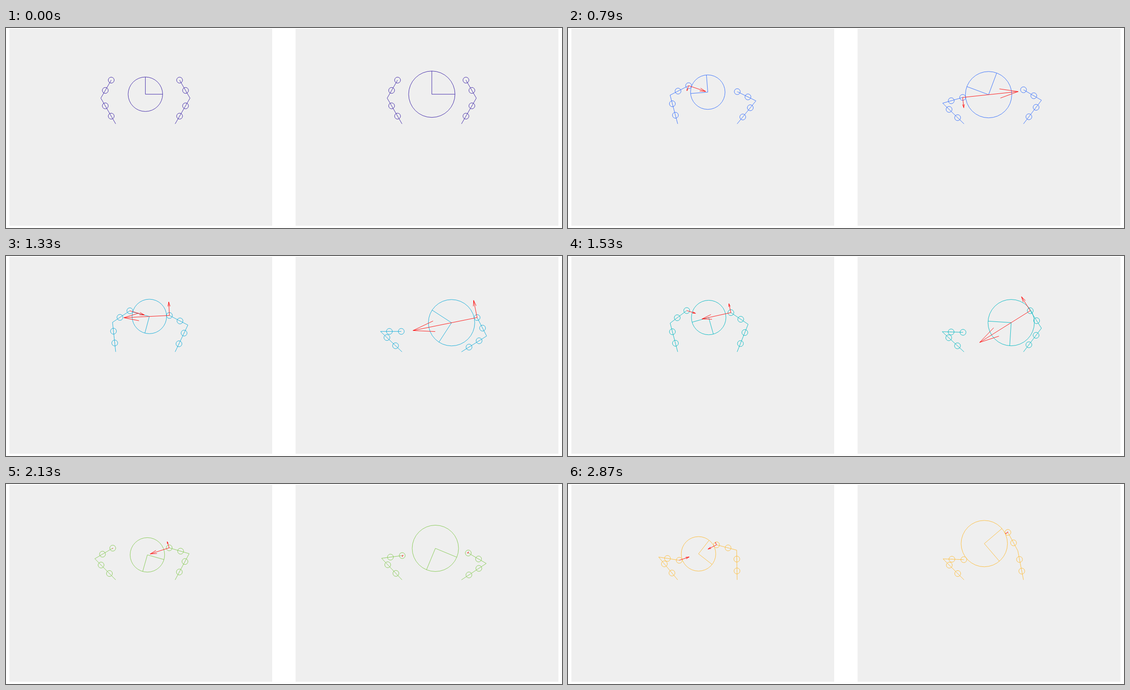
Write an HTML page with a canvas that moves like this. It is 1247 px wide and 449 px high and loops after 3.6 s.

```html
<!DOCTYPE html>
<html lang="en">
<head>
<meta charset="utf-8">
<title>Two-finger manipulation</title>
<style>
html, body { margin: 0; width: 100%; height: 100%; overflow: hidden; background: #fff; }
canvas { display: block; width: 1247px; height: 449px; }
</style>
</head>
<body>
<canvas id="stage" width="1247" height="449"></canvas>
<script>
const ctx = document.getElementById('stage').getContext('2d');
const LOOP = 3600, TICK = 66.6, LAST = 29;
const UNIT = 66.67, TIP = 46.67, PAD = 6.67, BASE_Y = 215.2;
const RAD = Math.PI / 180;

// pose: step, ball x, ball y, ball turn, left link angles, right link angles
// force: step, left normal, left tangent, right normal, right tangent
const panels = [
  {
    left: 8, base: 246, radius: 38.7,
    pose: [
      [0, 312.6, 148.7, 0, -30, 30, 30, -30],
      [3, , , , -28.5],
      [4, 334, 159.7, 23, -2, 90.3, 44, -88.4],
      [8, 313.5, 144, 94.5, -14.8, 62.9, 39.2, -63.7],
      [14, 321.5, 135.7, 165, -6.1, 56.3, 25.4, -62.6],
      [17, , , , -23],
      [18, , , , -44],
      [19, 304.5, 146.2, 237, -42.9, 48.9, 18.4, -44.3],
      [25, 329.7, 168, 271, -47.4, 77.6, 37.9, -103],
      [26, , , , -48.2],
      [29, 292.7, 156.8, 322, -39.8, 99, -0.9, -75.1]
    ],
    force: [
      [0, 0, 0, 0, 0],
      [4, 81.3, 11.2, 96.9, 29.3],
      [8, 40.6, 12.2, 0, 0],
      [14, 34.3, 0, 102.6, 30.5],
      [19, 0, 2.5, 0, 2.5],
      [25, 0, 0, 89.6, 26.7],
      [29, 23.7, 0, 21.6, 6]
    ]
  },
  {
    left: 650, base: 888.2, radius: 52,
    pose: [
      [0, 955, 148.7, 0, -30, 30, 30, -30],
      [1, , , , , , 31.5],
      [3, , 138, , , , 19],
      [4, 924.6, 146, 33.7, -48.6, 37.9, 12.4, -62.7],
      [8, 943.3, 149.7, 69.5, -45.9, 73.9, 37.3, -59.8],
      [11, , , , , , 54],
      [14, 999.3, 149.8, 147, -46.5, 90, 57.8, -27.2],
      [17, , , , , , 30],
      [18, , , , , , 32],
      [19, 978, 148.7, 218, -48.2, 93, 46.7, -47.4],
      [22, , , , , , 56.5],
      [25, 948.5, 138.7, 274, -38.6, 72, 24.5, -66.9],
      [29, 933.7, 133.8, 310.5, -45, 92.2, -11, -28.4]
    ],
    force: [
      [0, 0, 0, 0, 0],
      [4, 52.6, 15.5, 0, 0],
      [8, 125.3, 23.5, 0, 0],
      [14, 0, 0, 146.8, 39.4],
      [19, 0, 0, 102.5, 30.5],
      [25, 48.5, 14.3, 74, 22],
      [29, 0, 0, 5.8, 1.5]
    ]
  }
];

const palette = [
  [62, 38, 168], [69, 55, 213], [72, 77, 240], [70, 99, 254], [46, 123, 252],
  [43, 145, 239], [28, 169, 223], [1, 184, 202], [44, 196, 167],
  [87, 204, 122], [143, 203, 78], [185, 196, 49], [220, 189, 40], [254, 190, 60]
];

// Monotone cubic through the given points; empty cells are skipped.
function curve(rows, col, k) {
  const pts = rows.filter(r => r[col] !== undefined).map(r => [r[0], r[col]]);
  const slope = i => pts[i + 1]
    && pts[i] ? (pts[i + 1][1] - pts[i][1]) / (pts[i + 1][0] - pts[i][0]) : 0;
  const tangent = i => {
    const a = slope(i - 1), b = slope(i);
    return a * b > 0 ? 2 * a * b / (a + b) : 0;
  };
  let i = 0;
  while (i < pts.length - 2 && k >= pts[i + 1][0]) i++;
  const [k0, v0] = pts[i], [k1, v1] = pts[i + 1];
  const h = k1 - k0, u = (k - k0) / h, w = 1 - u;
  return v0 * w * w * (1 + 2 * u) + v1 * u * u * (3 - 2 * u)
    + h * u * w * (tangent(i) * w - tangent(i + 1) * u);
}

const values = (rows, k) =>
  rows[0].slice(1).map((_, i) => curve(rows, i + 1, k));

function shade(k) {
  const p = Math.min(k / LAST * 13, 12.999), i = Math.floor(p);
  const c = palette[i].map((v, j) => Math.round(v + (palette[i + 1][j] - v) * (p - i)));
  return `rgb(${c})`;
}

function path(...pts) {
  ctx.beginPath();
  pts.forEach(([x, y]) => ctx.lineTo(x, y));
  ctx.stroke();
}

function ring(x, y, r) {
  ctx.beginPath();
  ctx.arc(x, y, r, 0, 2 * Math.PI);
  ctx.stroke();
}

const along = ([x, y], angle, d) =>
  [x + d * Math.sin(angle * RAD), y - d * Math.cos(angle * RAD)];

function finger(x, a1, a2) {
  const base = [x, BASE_Y];
  const elbow = along(base, a1, UNIT), tip = along(elbow, a2, TIP);
  path(base, elbow, tip);
  for (const p of [along(base, a1, 20), along(base, a1, 46.67), along(elbow, a2, 20), tip])
    ring(...p, PAD);
  return tip;
}

function arrow([x, y], u, v) {
  if (Math.hypot(u, v) < 1) return;
  const end = [x + u, y + v];
  const barb = s => [end[0] - 0.33 * (u + s * 0.25 * v), end[1] - 0.33 * (v - s * 0.25 * u)];
  path([x, y], end);
  path(barb(1), end, barb(-1));
}

function contact(tip, x, y, radius, normal, tangent) {
  const dx = x - tip[0], dy = y - tip[1], d = Math.hypot(dx, dy);
  if (d > radius + PAD + 10) {
    normal = Math.min(normal, 2.5);
    tangent = Math.min(tangent, 2.5);
  }
  arrow(tip, dx / d * normal, dy / d * normal);
  arrow(tip, -dy / d * tangent, dx / d * tangent);
}

function drawPanel({ left, base, radius, pose, force }, k) {
  ctx.fillStyle = '#efefef';
  ctx.fillRect(left - 0.5, 2, 589.5, 442);
  const [x, y, turn, l1, l2, r1, r2] = values(pose, k);
  const [nl, tl, nr, tr] = values(force, k);
  ctx.strokeStyle = shade(k);
  ring(x, y, radius);
  path(along([x, y], 90 - turn, radius), [x, y], along([x, y], -turn, radius));
  const tipL = finger(base, l1, l2);
  const tipR = finger(base + 2 * UNIT, r1, r2);
  ctx.strokeStyle = '#ff1010';
  contact(tipL, x, y, radius, nl, tl);
  contact(tipR, x, y, radius, nr, tr);
}

// Poses advance on an uneven beat of one or two ticks.
const startOf = k => Math.floor(Math.floor((3 * k - (k > 13)) / 2) * TICK / 10) * 10;

function poseAt(t) {
  let k = LAST;
  while (k > 0 && startOf(k) > t) k--;
  return k;
}

function frame() {
  const k = poseAt(performance.now() % LOOP);
  ctx.fillStyle = '#fff';
  ctx.fillRect(0, 0, 1247, 449);
  ctx.lineWidth = 1;
  panels.forEach(p => drawPanel(p, k));
  requestAnimationFrame(frame);
}
frame();
</script>
</body>
</html>
```
